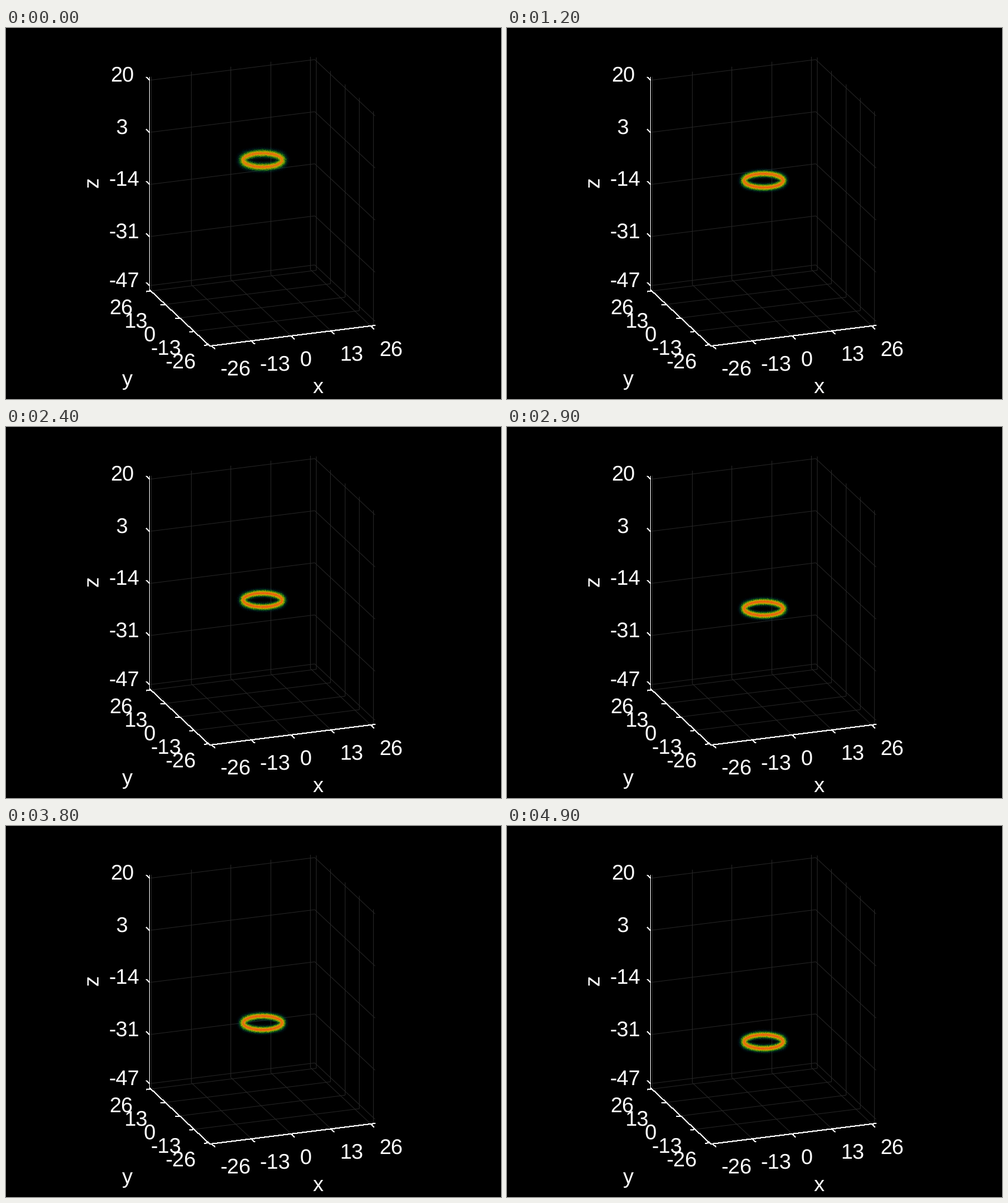
Animation of 840 by 630 pixels, one loop 5 s. Source, as a matplotlib script:

```python
import numpy as np
import matplotlib.pyplot as plt
from matplotlib.animation import FuncAnimation

W, H, DPI = 840, 630, 100
FRAMES, INTERVAL = 50, 100
PX = 72 / DPI  # points per pixel

X_LIM, Y_LIM, Z_LIM = (-26.6, 27.4), (-27.2, 27.2), (-48.35, 21.1)
XY_TICKS = (-26, -13, 0, 13, 26)
Z_TICKS = (20, 3, -14, -31, -47)

plt.rcParams["font.family"] = "Liberation Sans"
plt.rcParams["text.hinting"] = "none"
fig = plt.figure(figsize=(W / DPI, H / DPI), dpi=DPI, facecolor="black")
ax = fig.add_axes([0, 0, 1, 1])
ax.axis("off")


def project(x, y, z):
    """Orthographic view of the data box, in pixel indices."""
    u, v, w = x - X_LIM[0], y - Y_LIM[1], z - Z_LIM[0]
    return np.array([243.1 + 5.192 * u - 1.88 * v,
                     444 - 0.65 * u - 1.757 * v - 5.205 * w])


def line(p, q, color="#262626", width=1, smooth=True):
    x = np.array([p[0], q[0]])
    if np.isclose(*x):
        x = np.round(x)
    ax.plot(x, [p[1], q[1]], color=color, lw=width * PX, antialiased=smooth,
            snap=False, solid_capstyle="butt", zorder=1)


def axis_line(p, q):
    """Aliased white stroke, one pixel thick along its minor direction."""
    span = np.abs(q - p)
    line(p, q, "white", span.max() / np.hypot(*span), False)


def tick(p, step):
    axis_line(p, p + step)


def label(text, x, baseline, rotation=0):
    ax.text(x, baseline, text, color="white", fontsize=36 * PX, ha="center",
            va="baseline", rotation=rotation, rotation_mode="anchor", zorder=3)


def draw_box():
    (x0, x1), (y0, y1), (z0, z1) = X_LIM, Y_LIM, Z_LIM
    for t in XY_TICKS:
        line(project(t, y1, z0), project(t, y1, z1))
        line(project(t, y0, z0), project(t, y1, z0))
        line(project(x1, t, z0), project(x1, t, z1))
        line(project(x0, t, z0), project(x1, t, z0))
    for t in Z_TICKS:
        line(project(x0, y1, t), project(x1, y1, t))
        line(project(x1, y1, t), project(x1, y0, t))

    front, left = project(x0, y0, z0), project(x0, y1, z0)
    axis_line(front, project(x1, y0, z0))
    axis_line(front, left)
    axis_line(left, project(x0, y1, z1))

    for t in XY_TICKS:
        tick(project(t, y0, z0), np.array([5.5, 5.2]))
        tick(project(x0, t, z0), np.array([-7.5, 0.95]))
    for t in Z_TICKS:
        tick(project(x0, y1, t), np.array([-5.5, -5.2]))


def draw_labels():
    for t, x, y in zip(Z_TICKS, (196.5, 196.5, 200, 200, 200),
                       (90.5, 179, 267, 356, 439.5)):
        label(str(t), x, y)
    for i, (t, x) in enumerate(zip(XY_TICKS, (389, 456, 508, 586, 653))):
        label(str(t), x, 589.5 - 8.3 * i)
    for i, (t, x) in enumerate(zip(XY_TICKS, (296, 271, 243.5, 219.5, 194.5))):
        label(str(t), x, 577.5 - 23 * i)
    label("x", 529, 620)
    label("y", 205.5, 606)
    label("z", 156, 261.5, 90)


# Ring cross-section: distance from the core -> colour and opacity
STOPS = np.array([0, 1.5, 3, 4.5, 6, 8, 10, 13])
RAMP = np.array([[240, 80, 18, 255],
                 [230, 120, 10, 255],
                 [205, 160, 5, 255],
                 [120, 165, 8, 240],
                 [35, 130, 25, 200],
                 [0, 90, 55, 100],
                 [0, 55, 90, 40],
                 [0, 20, 60, 0]]) / 255

LEFT, WIDTH, HEIGHT = 385, 100, 60
RX, RY, CX = 33, 11.7, 435
THETA = np.linspace(0, 2 * np.pi, 180, endpoint=False)


def ring_image(n):
    rng = np.random.default_rng(n + 7)
    center = 223.9 + 2.895 * n
    top = int(center) - HEIGHT // 2
    start = np.exp(-n / 2)  # the ring is wider and softer at first

    gx, gy = np.meshgrid(LEFT + np.arange(WIDTH) - CX,
                         top + np.arange(HEIGHT) - center)
    d2 = np.full(gx.shape, np.inf)
    for t in THETA:
        d2 = np.minimum(d2, (gx - RX * np.cos(t)) ** 2
                        + (gy - RY * np.sin(t)) ** 2)
    side = np.clip(np.abs(gx) / RX, 0, 1) ** 4
    d = np.sqrt(d2) * (1.2 - 0.25 * side) / (1 + 0.22 * start)
    d += 0.8 * side + 0.7 * start

    stripes = 0.25 * np.sin(2 * np.pi * gx / 3.4 + 1.9 * n)
    d = np.maximum(d + stripes + rng.normal(0, 0.5, d.shape), 0)
    rgba = np.stack([np.interp(d, STOPS, c) for c in RAMP.T], axis=-1)
    extent = np.array([LEFT, LEFT + WIDTH, top + HEIGHT, top]) - 0.5
    return rgba, extent


def fit_stage():
    # Integer coordinates are pixel centres
    ax.set_xlim(-0.5, W - 0.5)
    ax.set_ylim(H - 0.5, -0.5)


draw_box()
draw_labels()
pixels, extent = ring_image(0)
ring = ax.imshow(pixels, extent=extent, aspect="auto",
                 interpolation="nearest", zorder=2)
fit_stage()


def update(n):
    pixels, extent = ring_image(n)
    ring.set_data(pixels)
    ring.set_extent(extent)
    fit_stage()
    return (ring,)


anim = FuncAnimation(fig, update, frames=FRAMES, interval=INTERVAL,
                     repeat=True, repeat_delay=0)
plt.show()
```
